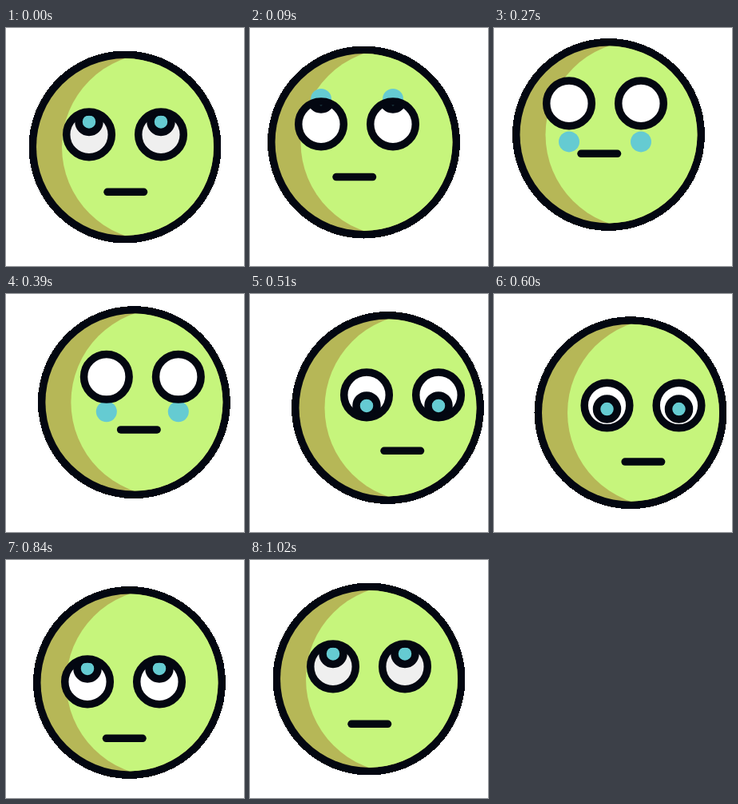
An HTML page that plays this animation: 298 by 298 pixels, repeating every 1.5 s.

```html
<!DOCTYPE html>
<html lang="en">
<head>
<meta charset="utf-8">
<title>Eye roll</title>
<style>
  html, body { margin: 0; width: 100%; height: 100%; overflow: hidden; background: #fff; }
  svg { display: block; width: 100vw; height: 100vh; }
  .line { fill: none; stroke: #030711; stroke-width: 9.5; stroke-linecap: round; }
  .iris { fill: #65cbd2; }
  .white { fill: var(--white); }
</style>
</head>
<body>
<svg viewBox="0 0 298 298">
  <defs>
    <clipPath id="skin"><circle cx="149" cy="149" r="111"/></clipPath>
    <clipPath id="ball"><circle r="26"/></clipPath>
    <g id="eye">
      <circle class="white" r="28"/>
      <circle class="iris pupil" r="13"/>
      <g clip-path="url(#ball)"><circle class="line pupil" r="13"/></g>
      <circle class="line" r="28.3"/>
    </g>
  </defs>
  <g id="face">
    <circle cx="149" cy="149" r="120.5" fill="#030711" shape-rendering="crispEdges"/>
    <circle cx="149" cy="149" r="111" fill="#b6b757"/>
    <circle cx="187.5" cy="149" r="117.5" fill="#c6f57c" clip-path="url(#skin)"/>
  </g>
  <g id="eyes">
    <g class="slot" transform="translate(104 133.4)"></g>
    <g class="slot" transform="translate(194 133.4)"></g>
  </g>
  <path id="mouth" class="line" d="M127 205.3H172.5"/>
</svg>
<script>
const LOOP = 1500, STEP = 30, HOLD = 540, END = 990;

// Key poses as offsets from rest: up left, far left, top, right, bottom, back.
const times = [0, 90, 180, 270, 510, 690, 810, END];
const rest = [0, 0];
const poses = {
  face: [rest, [-6.5, -6], [-13.5, -13], [-5.5, -15.5], [23.5, -6.5], [12.8, 10.5], [5.5, 4.5], rest],
  eyes: [rest, [-15, -13], [-28, -28], [-10, -39], [42, -7], [16, 28], [-2, 19], rest],
  mouth: [rest, [-19, -18.7], [-34, -37], [-18, -48], [41, -9], [16, 27], [-1.5, 18], rest]
};
// Pupil height inside the eye, at the same times.
const gaze = [-16, -31.5, 8, 48, 13.5, -11, -16.5, -16];
poses.pupil = gaze.map(y => [0, y]);

// Smooth curve through the keys, still at both ends.
function sample(keys, time, axis) {
  const last = times.length - 1;
  const value = i => keys[i][axis];
  const span = i => times[i + 1] - times[i];
  const slope = i => (value(i + 1) - value(i)) / span(i);
  const tangent = i => i === 0 || i === last ? 0
    : (slope(i - 1) * span(i) + slope(i) * span(i - 1)) / (span(i - 1) + span(i));

  let i = 0;
  while (i < last - 1 && time >= times[i + 1]) i++;
  const s = (time - times[i]) / span(i), r = 1 - s;
  return value(i) + (value(i + 1) - value(i)) * s * s * (3 - 2 * s)
    + span(i) * s * r * (r * tangent(i) - s * tangent(i + 1));
}

const eye = document.getElementById('eye');
for (const slot of document.querySelectorAll('.slot'))
  for (const part of eye.children) slot.append(part.cloneNode(true));
eye.remove();

const parts = Object.entries(poses).map(([name, keys]) => ({
  keys,
  nodes: document.querySelectorAll(name === 'pupil' ? '.pupil' : '#' + name)
}));

function draw(now) {
  const t = Math.floor((now % LOOP) / STEP) * STEP;
  // One step is repeated halfway through the roll.
  const time = Math.min(t > HOLD ? t - STEP : t, END);
  for (const { keys, nodes } of parts) {
    const move = `translate(${sample(keys, time, 0)} ${sample(keys, time, 1)})`;
    for (const node of nodes) node.setAttribute('transform', move);
  }
  const resting = time === 0 || time === END;
  document.documentElement.style.setProperty('--white', resting ? '#efefef' : '#fff');
}

function tick() {
  draw(performance.now());
  requestAnimationFrame(tick);
}
tick();
</script>
</body>
</html>
```
